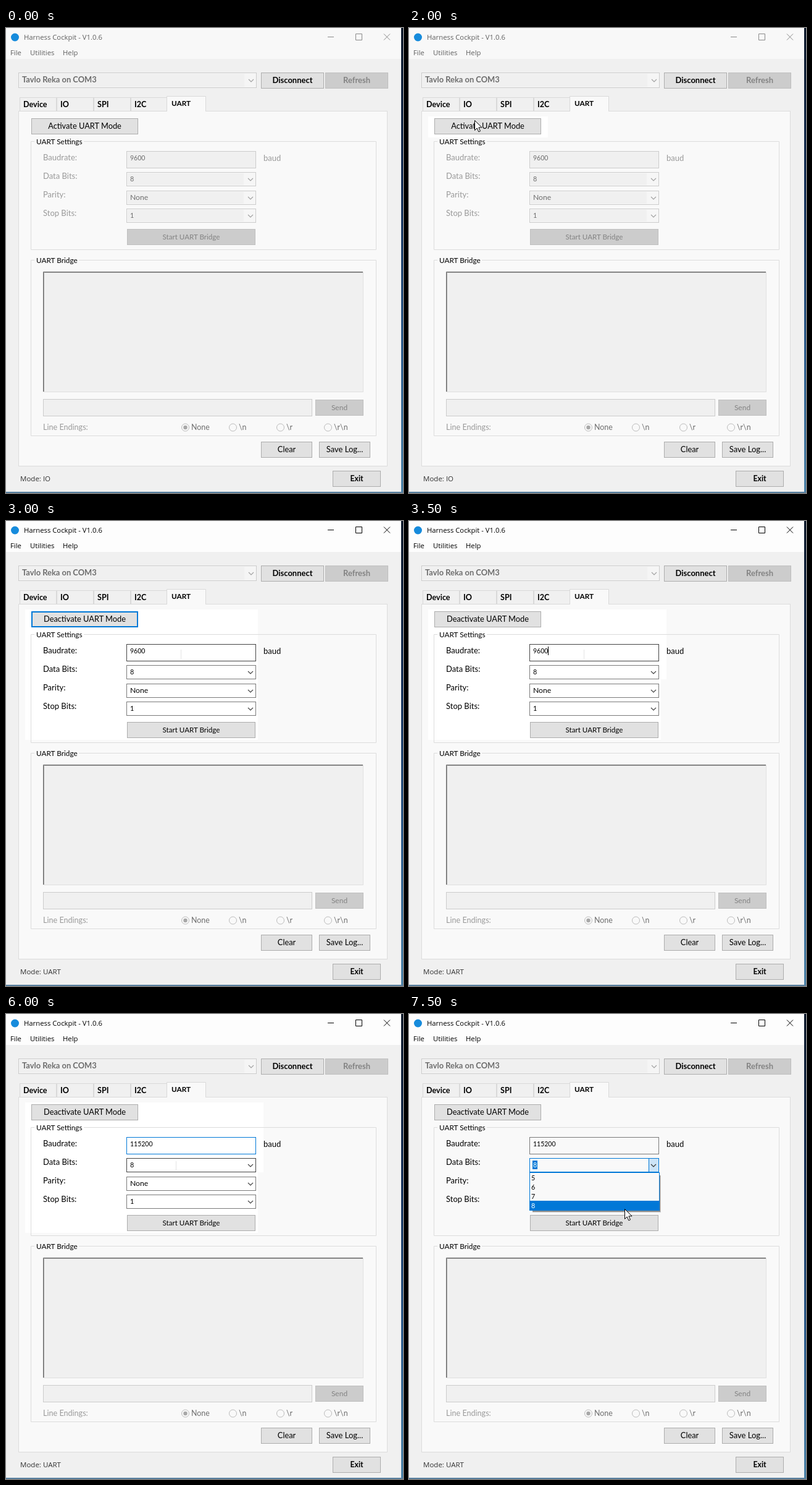
These frames come from a looping animation (643x752 px, 8 s). An HTML page:

```html
<!DOCTYPE html>
<html lang="en">
<head>
<meta charset="utf-8">
<title>UART settings</title>
<style>
  html, body { margin: 0; width: 100%; height: 100%; overflow: hidden; background: #f0f0f0; }
  svg { display: block; width: 643px; height: 752px; }
  text { font-family: Lato, "Open Sans", sans-serif; white-space: pre; }
  .sys { font-family: "Open Sans", "Noto Sans", sans-serif; }
  .bold { font-weight: 700; }
  .mid { text-anchor: middle; }
  rect { shape-rendering: crispEdges; }
</style>
</head>
<body>
<svg id="stage" viewBox="0 0 643 752"></svg>
<script>
const LOOP = 8000;
const BLUE = '#0078d7';
const stage = document.getElementById('stage');

// Each entry changes part of the state from its time on.
const timeline = [
  [0, { active: false, uart: false, button: 'normal', fresh: '', baud: '9600', caret: false,
        selected: false, baudEdge: '#7a7a7a', bitsEdge: '#7a7a7a', open: false, arrow: false,
        row: 3, pointer: null, beam: null, field: '#ffffff' }],
  [500, { pointer: [505, 140] }],
  [750, { pointer: [480, 110] }],
  [1000, { pointer: null }],
  [1500, { pointer: [290, 162] }],
  [1750, { pointer: [180, 156] }],
  [2000, { pointer: [106, 149], fresh: 'M31 143H225V177H31Z' }],
  [2250, { active: true, button: 'hover' }],
  [2500, { button: 'pressed' }],
  [2750, { uart: true, button: 'focus', fresh: 'M31 143H408V354H31Z', pointer: [150, 170] }],
  [3000, { pointer: null, beam: [283, 215], baudEdge: '#444' }],
  [3500, { button: 'normal', fresh: 'M31 143H417V256H408V354H31Z', caret: true }],
  [3750, { selected: true, caret: false }],
  [4000, { selected: false, baud: '1', caret: true, beam: null, baudEdge: '#555' }],
  [4250, { baud: '11' }],
  [4500, { baud: '115' }],
  [4750, { baud: '1152' }],
  [5250, { baud: '11520' }],
  [5500, { baud: '115200' }],
  [6000, { caret: false, baudEdge: BLUE, bitsEdge: '#444', beam: [275, 245] }],
  [6250, { beam: null, pointer: [392, 243], arrow: true, bitsEdge: BLUE }],
  [6500, { open: true, baudEdge: '#7a7a7a', fresh: 'M31 143H417V328H408V354H31Z' }],
  [6750, { pointer: [385, 251] }],
  [7000, { pointer: [373, 260], row: 0 }],
  [7250, { pointer: [362, 288], row: 2 }],
  [7500, { pointer: [349, 315], row: 3, fresh: '', field: '#f9f9f9' }]
];

const rect = (x, y, w, h, fill, extra = '') =>
  `<rect x="${x}" y="${y}" width="${w}" height="${h}" fill="${fill}" ${extra}/>`;
const box = (x, y, w, h, fill, edge, line = 1) =>
  rect(x + line / 2, y + line / 2, w - line, h - line, fill, `stroke="${edge}" stroke-width="${line}"`);
const label = (x, y, str, size = 13, fill = '#000', cls = '') =>
  `<text x="${x}" y="${y}" font-size="${size}" fill="${fill}" class="${cls}">${str}</text>`;
const path = (d, stroke, width = 1, fill = 'none') =>
  `<path d="${d}" fill="${fill}" stroke="${stroke}" stroke-width="${width}"/>`;
const chevron = (x, y, color) => path(`M${x - 4} ${y - 2}l4 4l4 -4`, color, 1.1);

const buttonStyles = {
  normal: ['#e1e1e1', '#adadad', 1],
  off: ['#cccccc', '#bfbfbf', 1],
  hover: ['#e5f1fb', BLUE, 1],
  pressed: ['#cce4f7', '#005499', 1],
  focus: ['#e1e1e1', BLUE, 2]
};
function button(x, y, w, h, str, size = 12.8, style = 'normal', cls = '') {
  return box(x, y, w, h, ...buttonStyles[style]) +
    label(x + w / 2, y + h / 2 + 4, str, size, style === 'off' ? '#838383' : '#000', 'mid ' + cls);
}

function group(y, h, title, titleEnd) {
  return path(`M46 ${y + .5}H40.5V${y + h - .5}H599.5V${y + .5}H${titleEnd}`, '#dcdcdc') +
    label(49, y + 5, title, 11.8);
}

function combo(y, value, on, edge, fill, size) {
  const dark = on ? '#000' : '#6d6d6d';
  return box(195, y, 210, 23, on ? fill : '#f6f6f6', on ? edge : '#cccccc') +
    (on ? '' : rect(197, y + 2, 188, 19, '#f0f0f0')) +
    label(201, y + 15, value, size, dark) +
    chevron(396, y + 12, on ? '#404040' : '#a0a0a0');
}

function windowFrame(s) {
  const ink = s.active ? '#000' : '#606060';
  const icon = s.active ? '#000' : '#8a8a8a';
  return rect(0, 0, 643, 752, '#f0f0f0') +
    rect(0, 0, 640, 50, s.active ? '#fdfdfd' : '#f8f8f8') +
    '<circle cx="14.5" cy="15" r="6.5" fill="#168bdc"/>' +
    label(29, 19, 'Harness Cockpit - V1.0.6', 11.3, ink, 'sys') +
    label(7, 44, 'File', 11.3, ink, 'sys') +
    label(39, 44, 'Utilities', 11.3, ink, 'sys') +
    label(92, 44, 'Help', 11.3, ink, 'sys') +
    path('M521 14.5H531M566.5 9.5H576.5V19.5H566.5ZM612 9.5L622 19.5M622 9.5L612 19.5', icon) +
    rect(640, 0, 3, 752, 'url(#desk)') + rect(0, 750, 643, 2, '#587f9f');
}

function tabs() {
  const names = ['Device', 'IO', 'SPI', 'I2C'];
  return box(20, 134, 598, 575, '#f9f9f9', '#dcdcdc') +
    names.map((name, i) => box(22 + i * 60, 112, 60, 23, '#f0f0f0', '#d9d9d9') +
      label(28 + i * 60, 128, name, 12.6, '#000', 'bold')).join('') +
    path('M260.5 135V110.5H323.5V134.5', '#d9d9d9', 1, '#f9f9f9') +
    rect(261, 133, 62, 3, '#f9f9f9') +
    label(268, 126, 'UART', 11.8, '#000', 'bold');
}

function connection() {
  return box(20, 72, 386, 25, '#f5f5f5', '#cccccc') + rect(22, 74, 364, 21, '#f0f0f0') +
    label(26, 88, 'Tavlo Reka on COM3', 12.9, '#6d6d6d', 'bold') + chevron(397, 85, '#a0a0a0') +
    button(413, 72, 102, 26, 'Disconnect', 13, 'normal', 'bold') +
    button(517, 72, 102, 26, 'Refresh', 13, 'off', 'bold');
}

function settings(s) {
  const ink = s.uart ? '#000' : '#9a9a9a';
  const end = 201 + s.baud.length * 6.08;
  const rows = ['Baudrate:', 'Data Bits:', 'Parity:', 'Stop Bits:'];
  return button(41, 146, 173, 26, (s.uart ? 'Deactivate' : 'Activate') + ' UART Mode', 12.8, s.button) +
    group(183, 176, 'UART Settings', 126) +
    rows.map((name, i) => label(60, 214 + i * 30, name, 13, ink)).join('') +
    box(195, 199, 210, 28, s.uart ? s.field : '#f0f0f0', s.uart ? s.baudEdge : '#cccccc') +
    (s.selected ? rect(200, 203, 25, 14, BLUE) : '') +
    label(201, 214, s.baud, 10.5, s.selected ? '#fff' : s.uart ? '#000' : '#6d6d6d') +
    (s.caret ? rect(Math.round(end), 203, 1, 14, '#000') : '') +
    label(417, 215, 'baud', 13, ink) +
    combo(233, '8', s.uart, s.bitsEdge, s.field, 10.8) +
    combo(263, 'None', s.uart, '#7a7a7a', s.field, 12.2) +
    combo(292, '1', s.uart, '#7a7a7a', s.field, 10.8) +
    button(196, 325, 208, 26, 'Start UART Bridge', 11.6, s.uart ? 'normal' : 'off');
}

function bridge(s) {
  const radios = [[290.5, 'None'], [367.5, '\\n'], [444.5, '\\r'], [521.5, '\\r\\n']];
  return group(375, 285, 'UART Bridge', 118) +
    rect(60, 394, 519, 195, '#f0f0f0') +
    path('M60.5 588V394.5H578', '#696969') + path('M61.5 588V395.5H578', '#a0a0a0') +
    path('M60 588.5H578.5V395', '#e0e0e0') +
    box(60, 600, 436, 28, '#f0f0f0', '#cccccc') +
    button(501, 601, 78, 26, 'Send', 12, 'off') +
    label(60, 650, 'Line Endings:', 12.6, '#9a9a9a') +
    radios.map(([x, name], i) =>
      `<circle cx="${x}" cy="646" r="6" fill="#f9f9f9" stroke="#bcbcbc"/>` +
      (i ? '' : `<circle cx="${x}" cy="646" r="3.2" fill="#a8a8a8"/>`) +
      label(x + 9.5, 650, name, 12.4, '#6d6d6d')).join('') +
    button(413, 669, 83, 26, 'Clear') +
    button(507, 669, 83, 26, 'Save Log...', 13) +
    label(23, 733, 'Mode: ' + (s.uart ? 'UART' : 'IO'), 11.5, '#333', 'sys') +
    button(529, 716, 78, 26, 'Exit', 12.3, 'normal', 'bold');
}

function dropdown(s) {
  let out = '';
  if (s.arrow) out += box(388, 233, 17, 23, '#cce4f7', BLUE) + chevron(396, 245, '#333');
  if (!s.open) return out;
  out += rect(200, 237, 8, 14, BLUE) + label(201, 248, '8', 10.8, '#fff') +
    rect(200, 261, 207, 59, '#000', 'opacity=".32"') +
    rect(200, 261, 208, 60, '#000', 'opacity=".16"') +
    box(195, 256, 211, 62, s.field, BLUE) +
    rect(196, 257 + s.row * 15, 209, 15, BLUE);
  for (let i = 0; i < 4; i++)
    out += label(198, 269 + i * 15, 5 + i, 10.8, i === s.row ? '#fff' : '#000');
  return out;
}

function cursor(s) {
  let out = '';
  if (s.beam) out += rect(s.beam[0], s.beam[1] - 7, 1, 15, '#e4e4e4');
  if (s.pointer) {
    const [x, y] = s.pointer;
    out += path(`M${x + .5} ${y + .5}v16l3.7 -3.6l2.7 6l2.6 -1.2l-2.6 -5.8h5.2Z`, '#000', 1, '#fff');
  }
  return out;
}

const defs = `<defs><linearGradient id="desk" x2="0" y2="1">
  <stop stop-color="#071426"/><stop offset=".35" stop-color="#102c55"/>
  <stop offset=".7" stop-color="#2a5b8c"/><stop offset="1" stop-color="#4a82a8"/>
</linearGradient></defs>`;

function draw(s) {
  stage.innerHTML = defs + windowFrame(s) + connection() + tabs() +
    (s.fresh ? path(s.fresh, 'none', 0, '#fff') : '') +
    settings(s) + bridge(s) + dropdown(s) + cursor(s);
}

let shown = -1;
function tick() {
  const t = performance.now() % LOOP;
  const count = timeline.filter(([at]) => at <= t).length;
  if (count !== shown) {
    shown = count;
    draw(Object.assign({}, ...timeline.slice(0, count).map(([, change]) => change)));
  }
  requestAnimationFrame(tick);
}
tick();
</script>
</body>
</html>
```
